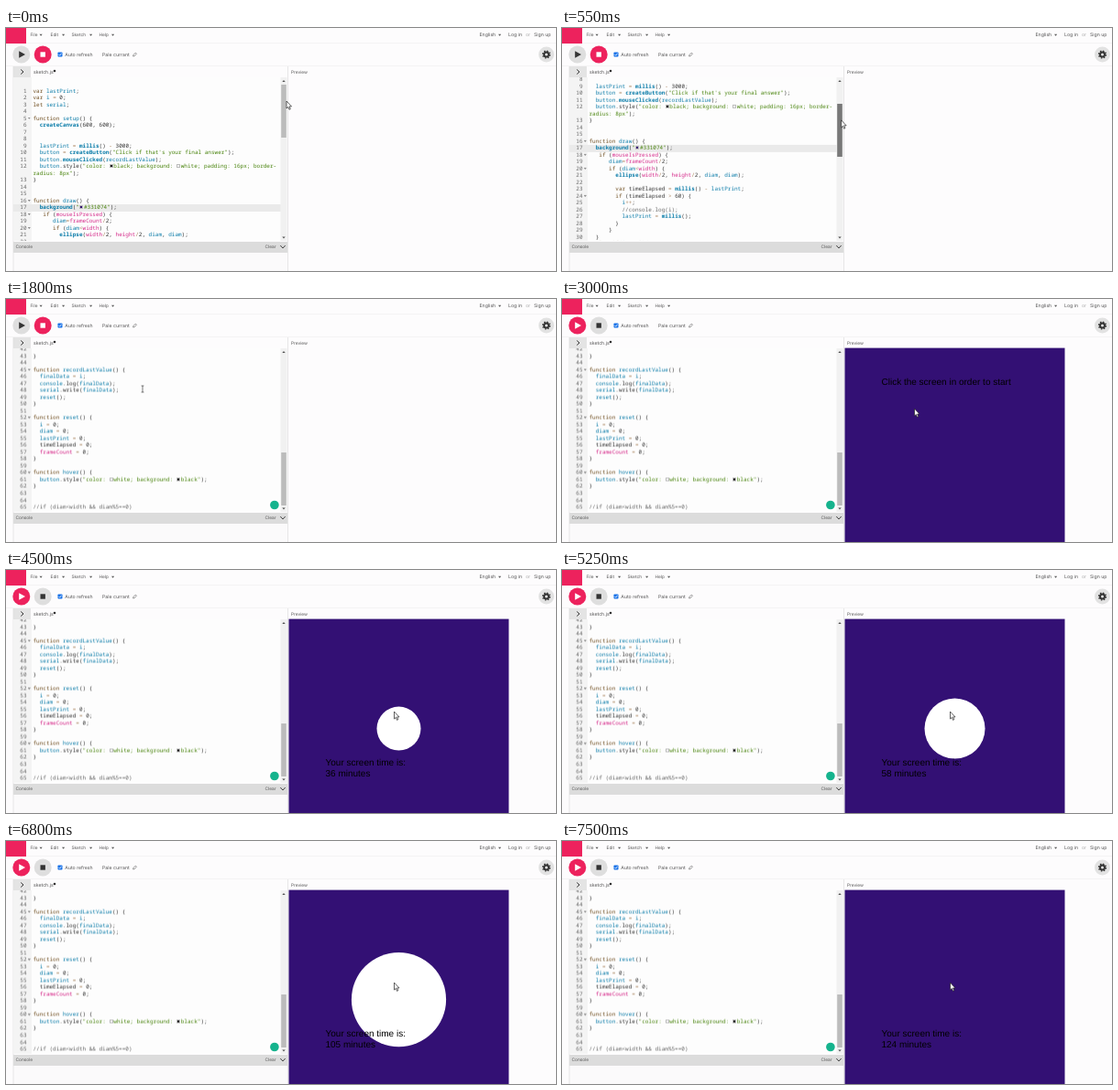
Animation of 600 by 266 pixels, one loop 8150 ms. Source, as an HTML page:

```html
<!DOCTYPE html>
<html lang="en">
<head>
<meta charset="utf-8">
<title>Screen time sketch</title>
<style>
html, body { margin: 0; width: 100%; height: 100%; overflow: hidden; background: #fdfcfd; }
#stage { position: relative; width: 600px; height: 266px; overflow: hidden; text-rendering: geometricPrecision; }
svg { position: absolute; left: 0; top: 0; }
svg text { font: 5.2px Inter, sans-serif; fill: #555; }
svg .small { font-size: 4.8px; }
svg .canvas { font: 10px "Liberation Sans", Arial, sans-serif; fill: #000; }
#editor { position: absolute; left: 8px; top: 54px; width: 292px; height: 179px; overflow: hidden;
  background: linear-gradient(90deg, #f4f4f4 20px, #fdfdfd 20px); }
#code { padding-top: 11.5px; font: 6px/7.53px "Noto Sans Mono", monospace; color: #333; will-change: transform; }
.row { position: relative; height: 7.53px; padding-left: 21.5px; white-space: pre; }
.row.active { background: #eaeaea; }
.num { position: absolute; left: 0; width: 14.5px; text-align: right; color: #666; }
.fold { position: absolute; left: 15.6px; top: 2px; width: 3.4px; height: 2.2px; background: #888;
  clip-path: polygon(0 0, 100% 0, 50% 100%); }
.swatch { display: inline-block; width: 4px; height: 4px; margin: 0 .5px; box-sizing: border-box; border: .4px solid #bbb; }
.keyword { color: #704f21; }
.name { color: #0b7ca9; }
.call { color: #0b7ca9; font-weight: 700; }
.global { color: #d52889; }
.string { color: #47820a; }
.comment { color: #666; }
.op { color: #a67f59; }
</style>
</head>
<body>
<div id="stage">
  <svg width="600" height="266">
    <rect width="600" height="266" fill="#fdfcfd"/>
    <path d="M22 16.5H600M0 41.5H600" stroke="#eee" stroke-width=".6"/>
    <rect width="22" height="17" fill="#ed225d"/>
    <text class="small" x="26.5" y="9.2">File</text>
    <text class="small" x="48.5" y="9.2">Edit</text>
    <text class="small" x="71.5" y="9.2">Sketch</text>
    <text class="small" x="101.5" y="9.2">Help</text>
    <text x="516.5" y="9.2">English</text>
    <text x="548" y="9.2">Log in</text>
    <text x="567" y="9.2" style="fill:#aaa">or</text>
    <text x="576" y="9.2">Sign up</text>
    <path id="carets" fill="#555"/>

    <circle id="play" cx="16.8" cy="29" r="9.5"/>
    <path id="playIcon" d="M14.2 25.2 21 29 14.2 32.8Z"/>
    <circle id="stop" cx="40.2" cy="29" r="9.5"/>
    <rect id="stopIcon" x="37.5" y="26.3" width="5.4" height="5.4"/>
    <rect x="56.5" y="26.5" width="5" height="5" rx=".7" fill="#1a73e8"/>
    <path d="M57.6 29 58.7 30.2 60.5 27.7" fill="none" stroke="#fff" stroke-width=".8"/>
    <text x="64.3" y="30.8">Auto refresh</text>
    <text x="105" y="30.8">Pale currant</text>
    <path d="M138.6 31 139 29.4 141.3 27.1 142.5 28.3 140.2 30.6Z" fill="none" stroke="#555" stroke-width=".6"/>
    <circle cx="589.5" cy="29" r="8.5" fill="#e2e2e2"/>
    <circle cx="589.5" cy="29" r="3.9" fill="none" stroke="#333" stroke-width="1.4" stroke-dasharray="1.53"/>
    <circle cx="589.5" cy="29" r="2.5" fill="none" stroke="#333" stroke-width="2"/>

    <rect x="8" y="42" width="19" height="12" fill="#e4e4e4"/>
    <path d="M16.2 45.5 19 48 16.2 50.5" fill="none" stroke="#333"/>
    <text x="30" y="50">sketch.js</text>
    <circle cx="53" cy="47" r="1.3" fill="#333"/>
    <text class="small" x="311" y="50">Preview</text>
    <rect x="8" y="234" width="299" height="12" fill="#dcdcdc"/>
    <rect x="8" y="246" width="299" height="20" fill="#fbfafb"/>
    <text class="small" x="10.5" y="241.3">Console</text>
    <text class="small" x="282.5" y="241.3">Clear</text>
    <path d="M299.3 238 302 241 304.7 238" fill="none" stroke="#444"/>
    <path d="M8 42V266M307.5 42V266" stroke="#ddd" stroke-width=".7"/>

    <g id="preview" transform="translate(-.5 -.4)">
      <rect x="309" y="54" width="240" height="240" fill="#331074"/>
      <circle id="disc" cx="429" cy="174" fill="#fff"/>
      <text id="prompt" class="canvas" x="349" y="94">Click the screen in order to start</text>
      <g id="report">
        <text class="canvas" x="349" y="214">Your screen time is:</text>
        <text id="count" class="canvas" x="349" y="226.5"></text>
      </g>
    </g>
  </svg>

  <div id="editor"><div id="code"></div></div>

  <svg width="600" height="266">
    <rect x="299.5" y="54" width="7" height="179" fill="#f1f1f1"/>
    <path d="M301.3 59H304.7L303 57ZM301.3 228.5H304.7L303 230.5Z" fill="#555"/>
    <rect id="thumb" x="300.2" y="62" width="5.6" height="58"/>
    <circle id="helper" cx="292.9" cy="225.5" r="4.8" fill="#15b38d"/>
    <g id="pointer">
      <path id="arrow" d="M0 0V8L1.8 6.4 3 9.3 4.3 8.7 3.1 5.9H5.5Z" fill="#fff" stroke="#222" stroke-width=".7"/>
      <path id="beam" d="M-1.4-3.5H1.4M0-3.5V3.5M-1.4 3.5H1.4" stroke="#222" stroke-width=".6"/>
    </g>
  </svg>
</div>
<script>
const $ = id => document.getElementById(id);

// "■", "□" and "◆" become colour swatches; "~" continues a wrapped string.
const source = String.raw`var lastPrint;
var i = 0;
let serial;

function setup() {
  createCanvas(600, 600);


  lastPrint = millis() - 3000;
  button = createButton("Click if that's your final answer");
  button.mouseClicked(recordLastValue);
  button.style("color: ■black; background: □white; padding: 16px; border-
~radius: 8px");
}


function draw() {
  background("◆#331074");
   if (mouseIsPressed) {
      diam=frameCount/2;
      if (diam<width) {
        ellipse(width/2, height/2, diam, diam);

        var timeElapsed = millis() - lastPrint;
        if (timeElapsed > 60) {
          i++;
          //console.log(i);
          lastPrint = millis();
        }
      }
  }
  else if(i == 0){
    textSize(25)
    text("Click the screen in order to start", width/6, height / 6);
  }

  if (i != 0){
    text("Your screen time is: \n" + i + " minutes",
              width/6, height / 1.5);
  }



}

function recordLastValue() {
  finalData = i;
  console.log(finalData);
  serial.write(finalData);
  reset();
}

function reset() {
  i = 0;
  diam = 0;
  lastPrint = 0;
  timeElapsed = 0;
  frameCount = 0;
}

function hover() {
  button.style("color: □white; background: ■black");
}


//if (diam<width && diam%5==0)`;

const kinds = {
  keyword: "var let function if else",
  call: "createCanvas millis createButton mouseClicked background ellipse textSize text",
  global: "mouseIsPressed frameCount width height"
};
const plain = /^(timeElapsed|style|log|write|\d+)$/;
const swatches = { "■": "#000", "□": "#fff", "◆": "#331074" };

const escape = s => s.replace(/&/g, "&amp;").replace(/</g, "&lt;");
const span = (kind, s) => `<span class="${kind}">${s}</span>`;

function kindOf(word) {
  for (const kind in kinds) if (kinds[kind].split(" ").includes(word)) return kind;
  return plain.test(word) ? "" : "name";
}

function paint(line) {
  return line.replace(/\/\/.*|~[^"]*"|"[^"]*"?|\w+|[-+*\/<>=!&%]+/g, s => {
    if (s.startsWith("//")) return span("comment", escape(s));
    if (/^["~]/.test(s)) {
      const body = s.replace("~", "").replace(/[■□◆]/g, c =>
        `<span class="swatch" style="background:${swatches[c]}"></span>`);
      return span("string", body);
    }
    return span(/\w/.test(s) ? kindOf(s) : "op", escape(s));
  });
}

let number = 0;
$("code").innerHTML = source.split("\n").map(line => {
  const wrapped = line[0] === "~";
  if (!wrapped) number++;
  const gutter = wrapped ? "" : span("num", number);
  const fold = line.endsWith("{") ? span("fold", "") : "";
  const active = !wrapped && number === 17 ? " active" : "";
  return `<div class="row${active}">${gutter}${fold}${paint(line)}</div>`;
}).join("");

$("carets").setAttribute("d", [36.5, 61, 91, 115, 537].map(x => `M${x} 6.8h3.2l-1.6 2Z`).join(""));

const LOOP = 8150, STEP = 50;
const RUN = 2500, PRESS = 3300, RELEASE = 7450;
const SCROLL_END = 329.5, THUMB_TRAVEL = 106;

const scrollPath = [[50, 0], [300, 20], [1000, 146.5], [1550, SCROLL_END]];
const pointerPath = [
  [50, 306, 80], [300, 305, 86.4], [1000, 304, 127], [1550, 304, 186], [1650, 304, 186],
  [1800, 149, 98.5], [2250, 17, 29], [2450, 17, 29], [3000, 384.5, 120], [3250, 423.5, 155]
];

// Linear position along [time, ...values] keys.
function along(path, t) {
  if (t <= path[0][0]) return path[0].slice(1);
  const k = path.findIndex(p => p[0] > t);
  if (k < 0) return path[path.length - 1].slice(1);
  const a = path[k - 1], b = path[k], u = (t - a[0]) / (b[0] - a[0]);
  return a.slice(1).map((v, j) => v + (b[j + 1] - v) * u);
}

const show = (id, on) => { $(id).style.display = on ? "" : "none"; };
const fill = (id, color) => { $(id).style.fill = color; };

function draw(t) {
  const [scroll] = along(scrollPath, t);
  $("code").style.transform = `translateY(${-scroll}px)`;
  $("thumb").setAttribute("y", 62 + scroll / SCROLL_END * THUMB_TRAVEL);
  fill("thumb", t > 50 && t < 1650 ? "#787878" : "#bcbcbc");
  show("helper", t >= 1550);

  const playing = t >= 2300;
  fill("play", playing ? "#ed225d" : "#dedede");
  fill("playIcon", playing ? "#fff" : "#333");
  fill("stop", playing ? "#dedede" : "#ed225d");
  fill("stopIcon", playing ? "#333" : "#fff");

  const minutes = Math.max(0, Math.floor((Math.min(t, RELEASE) - PRESS) * .03));
  show("preview", t >= RUN);
  show("disc", t >= PRESS && t <= RELEASE);
  $("disc").setAttribute("r", Math.max(0, t - RUN) * .012);
  show("prompt", t < PRESS);
  show("report", minutes > 0);
  $("count").textContent = minutes + " minutes";

  const [x, y] = along(pointerPath, t);
  const overCode = x > 28 && x < 298 && y > 54 && y < 233;
  $("pointer").setAttribute("transform", `translate(${x} ${y})`);
  show("arrow", !overCode);
  show("beam", overCode);
}

const start = performance.now();
function tick() {
  const t = (performance.now() - start) % LOOP;
  draw(Math.floor(t / STEP) * STEP);
  requestAnimationFrame(tick);
}
tick();
</script>
</body>
</html>
```
